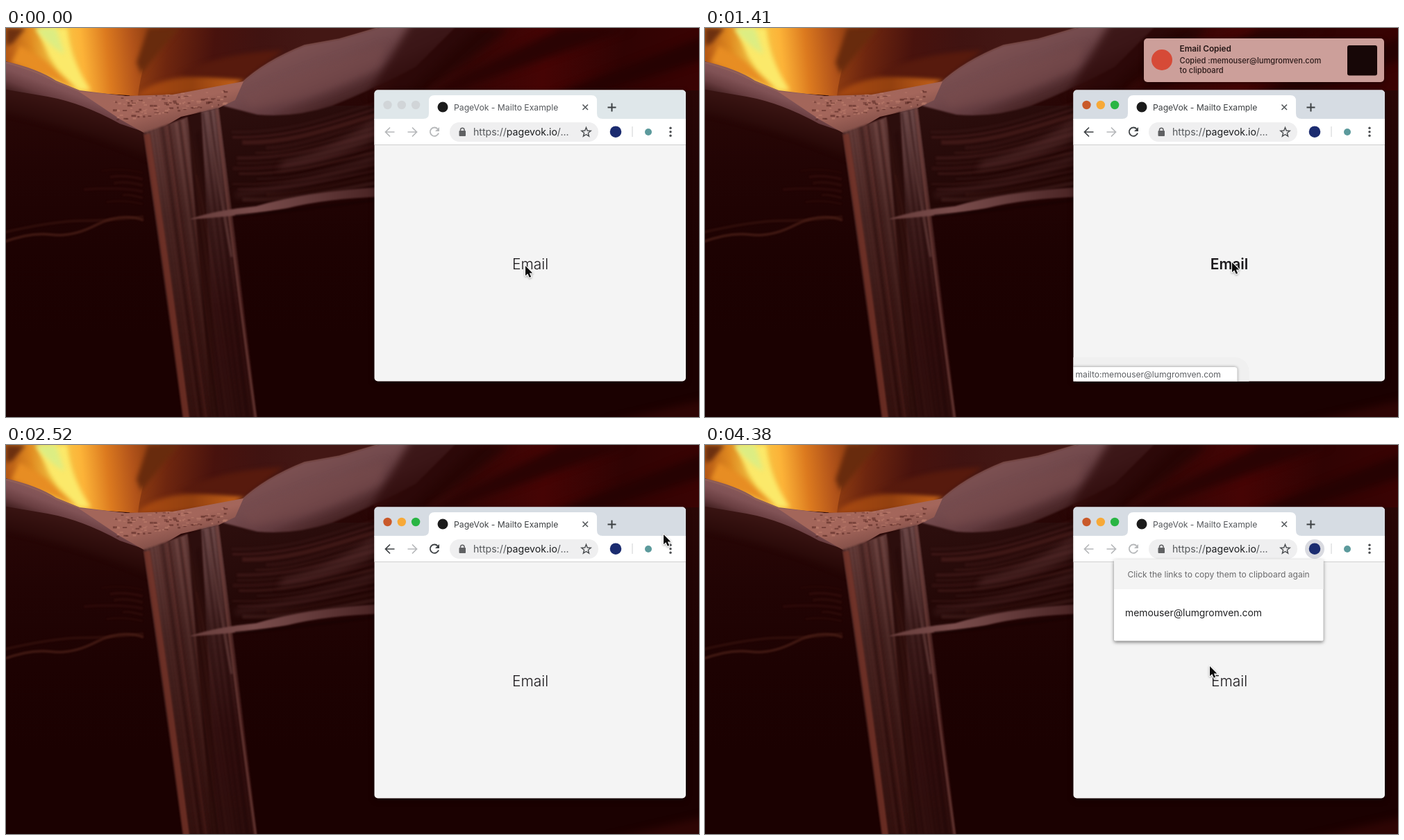
Animation, 998 px wide and 561 px high, one loop 4410 ms. Source, as an HTML page with a canvas:

```html
<!DOCTYPE html>
<html lang="en">
<head>
<meta charset="utf-8">
<title>Copy email on click</title>
<style>
  html, body { margin: 0; width: 100%; height: 100%; overflow: hidden; background: #1c0202; }
  canvas { display: block; }
</style>
</head>
<body>
<canvas id="stage" width="998" height="561"></canvas>
<script>
const W = 998, H = 561, LOOP = 4410, STEP = 30;
const ctx = document.getElementById('stage').getContext('2d');
const ADDRESS = 'memouser@lumgromven.com';
const DARK = '#3c4043', PALE = '#b6b8ba';

// ---------- helpers ----------
function gradient(c, x0, y0, x1, y1, ...stops) {
  const g = c.createLinearGradient(x0, y0, x1, y1);
  stops.forEach((color, i) => g.addColorStop(i / (stops.length - 1), color));
  return g;
}

// "M..." path strings keep the shapes compact
function fill(c, d, color) { c.fillStyle = color; c.fill(new Path2D(d)); }

function line(c, d, color, width = 1) {
  c.strokeStyle = color;
  c.lineWidth = width;
  c.stroke(new Path2D(d));
}

function blurred(c, radius, draw) {
  c.filter = `blur(${radius}px)`;
  draw();
  c.filter = 'none';
}

function disc(x, y, r, color) {
  ctx.fillStyle = color;
  ctx.beginPath();
  ctx.arc(x, y, r, 0, Math.PI * 2);
  ctx.fill();
}

function box(x, y, w, h, r, color) {
  ctx.fillStyle = color;
  ctx.beginPath();
  ctx.roundRect(x, y, w, h, r);
  ctx.fill();
}

function text(s, x, y, size, color, weight = 400, align = 'left') {
  ctx.font = `${weight} ${size}px Inter, sans-serif`;
  ctx.fillStyle = color;
  ctx.textAlign = align;
  ctx.fillText(s, x, y);
  return x + ctx.measureText(s).width;
}

function shadowed(blur, dy, alpha, draw) {
  ctx.save();
  ctx.shadowColor = `rgba(0,0,0,${alpha})`;
  ctx.shadowBlur = blur;
  ctx.shadowOffsetY = dy;
  draw();
  ctx.restore();
}

function randomizer(seed) {
  return () => (seed = (seed * 16807) % 2147483647) / 2147483647;
}

const clamp = v => Math.max(0, Math.min(1, v));
const smooth = v => { v = clamp(v); return v * v * (3 - 2 * v); };
const ramp = (t, a, b) => smooth((t - a) / (b - a));

// ---------- wallpaper ----------
function paintHollow(c) {
  fill(c, 'M520 0H998V90H530Z', gradient(c, 560, 0, 998, 60, '#3c100e', '#340605', '#460404', '#300303', '#3a0303'));
  blurred(c, 6, () => {
    fill(c, 'M650 0L725 0 600 95 530 100Z', '#270504');
    fill(c, 'M800 0L900 0 640 92 610 92Z', '#2a0303');
    fill(c, 'M1010 10L1010 44 850 95 790 95Z', '#260202');
    fill(c, 'M1010 535L1010 570 860 570Z', '#2e0504');
  });
  fill(c, 'M150 0H560L390 60 335 90 180 104Z', gradient(c, 170, 10, 430, 40, '#a34a13', '#6e260f', '#48120d', '#401311', '#431714'));
  fill(c, 'M0 0H222Q196 45 190 98L100 92 0 48Z', gradient(c, 0, 22, 215, 0, '#b65a16', '#e08a20', '#f6d04c', '#fcb338', '#dc7a1f', '#b3541a', '#86380f'));
  blurred(c, 3, () => {
    fill(c, 'M44 0H88Q92 45 122 90H104Q80 70 62 40Z', '#fbe96a');
    fill(c, 'M42 0H72L84 38Q60 25 42 0Z', '#dced83');
    fill(c, 'M0 0H28L10 22 0 26Z', '#6c3010');
    fill(c, 'M20 25L58 48 100 88 60 70 8 50Z', '#e78d23');
    fill(c, 'M205 0H250Q215 40 195 66L188 50Z', '#682b0d');
    fill(c, 'M188 98Q225 60 345 72L325 88 230 98Z', gradient(c, 190, 0, 345, 0, '#a94a12', '#93400f', '#c9661b'));
    fill(c, 'M250 66Q310 35 400 32L345 74Z', '#571a0d');
  });
}

function paintSlopes(c, rnd) {
  // strata below the right slope, fading into the shade
  fill(c, 'M300 112H540V232L430 246 318 262Z', gradient(c, 360, 110, 400, 262, '#2c0e0d', '#260a09', '#200504'));
  blurred(c, 1.5, () => {
    for (let i = 0; i < 14; i++) {
      const y = 150 + i * 7.5, end = 104 + i * 9;
      line(c, `M${325 + rnd() * 50} ${y}C410 ${y + 2} 470 ${(y + end) / 2} 545 ${end}`,
        `rgba(${95 + rnd() * 30},56,54,${.12 + rnd() * .28})`, 1.5 + rnd() * 5);
    }
  });
  blurred(c, 4, () => {
    fill(c, 'M400 192Q480 172 545 120V152Q480 192 390 205Z', 'rgba(96,54,54,.45)');
    fill(c, 'M330 236Q440 222 545 175V190Q440 232 330 246Z', 'rgba(88,46,46,.35)');
  });

  // left slope
  blurred(c, 3, () => fill(c, 'M-10 84L70 90 165 128 202 148 206 190Q120 150 -10 122Z', gradient(c, 60, 92, 45, 150, '#3d1715', '#230504')));
  blurred(c, .7, () => fill(c, 'M-5 47Q45 58 72 76L106 90 172 98 205 152 164 138Q110 108 60 99L-5 88Z',
    gradient(c, 62, 66, 46, 108, '#8a5a5b', '#805255', '#683d40', '#3e1c1c')));
  line(c, 'M0 50Q45 62 72 78L106 91', 'rgba(156,104,90,.55)', 2);

  // right slope
  blurred(c, 1, () => fill(c, 'M312 112L338 80Q372 48 430 25L480 16 548 -4H650L590 56Q530 88 470 112 415 130 362 125Z',
    gradient(c, 425, 24, 468, 122, '#7d5152', '#734a4d', '#623b3f', '#3c1a1a')));
  blurred(c, 6, () => {
    fill(c, 'M340 98Q420 62 545 24L540 55Q450 104 352 116Z', 'rgba(124,78,78,.5)');
    fill(c, 'M585 -10H690L580 90 520 98Z', 'rgba(46,10,10,.75)');
  });
  line(c, 'M338 81Q372 48 430 25L480 16 535 0', 'rgba(140,92,86,.5)', 1.5);

  // faint ridges on the left wall
  blurred(c, 1.2, () => {
    for (let i = 0; i < 6; i++) {
      const y = 206 + i * 9;
      line(c, `M${110 + rnd() * 60} ${y}Q170 ${y - 4} 197 ${y + 3}`, `rgba(83,33,26,${.12 + rnd() * .18})`, 2 + rnd() * 2);
    }
    line(c, 'M-4 309Q35 294 65 298T130 284 198 277', 'rgba(84,38,28,.6)', 4);
    line(c, 'M-4 295Q70 278 110 278T198 272', 'rgba(72,28,22,.4)', 4);
  });
}

function paintShelf(c, rnd) {
  fill(c, 'M104 91L172 98 240 96 342 77 330 104 305 116 252 128 225 144 200 152 165 132Z',
    gradient(c, 190, 92, 205, 150, '#a3665a', '#a4665b', '#845049'));
  blurred(c, .6, () => {
    for (let i = 0; i < 120; i++) {
      const u = rnd();
      c.fillStyle = rnd() < .5 ? 'rgba(84,38,32,.55)' : 'rgba(196,132,114,.5)';
      c.fillRect(150 + u * 165, 101 - u * 12 + rnd() * (34 - u * 14), 2 + rnd() * 5, 1 + rnd() * 2);
    }
  });
}

function paintSandfall(c, rnd) {
  blurred(c, 1.2, () => {
    fill(c, 'M198 151L222 143 262 128 278 220 306 561H254Z', gradient(c, 0, 130, 0, H, '#6b423f', '#4d2926', '#3f1b18', '#361310'));
    fill(c, 'M262 128L281 121 316 561H296Z', gradient(c, 0, 125, 0, H, '#2c0e0d', '#2e0e0c', '#2e0f0c'));
    fill(c, 'M281 121L306 115 330 300 362 561H305Z', gradient(c, 0, 115, 0, H, '#6d4949', '#41201f', '#310f0f', '#2e0e0d'));
    for (let i = 0; i < 34; i++) {
      const u = rnd(), tone = rnd(), gap = u > .58 && u < .76;
      const top = 151 - u * 36 + (gap ? 90 * rnd() : 0);
      line(c, `M${199 + u * 107} ${top}Q${226 + u * 107} 340 ${257 + u * 104} 565`,
        tone < .5 ? 'rgba(32,5,5,.2)' : `rgba(${110 + 30 * tone},70,64,${gap ? .07 : .15})`, 1.5 + rnd() * 4);
    }
    line(c, 'M203 153Q230 330 260 565', 'rgba(122,54,42,.75)', 9);
    line(c, 'M303 117Q327 330 360 565', 'rgba(116,68,64,.65)', 2.5);
    line(c, 'M291 120Q304 220 325 330', 'rgba(150,104,100,.28)', 4);
  });
}

function paintLedge(c) {
  blurred(c, .8, () => {
    fill(c, 'M266 275Q305 262 360 257 430 236 545 229V243Q460 246 405 260 350 270 266 276Z',
      gradient(c, 270, 0, 530, 0, '#683e3c', '#7a4d4c', '#633a3a', '#4a2424'));
    line(c, 'M330 271Q430 262 545 246', 'rgba(22,2,2,.5)', 4);
  });
}

function paintWallpaper() {
  const canvas = document.createElement('canvas');
  canvas.width = W;
  canvas.height = H;
  const c = canvas.getContext('2d');
  const rnd = randomizer(77);
  c.fillStyle = gradient(c, 0, 80, 0, H, '#2a0706', '#220404', '#1d0202', '#1b0101', '#1b0101');
  c.fillRect(0, 0, W, H);
  paintHollow(c);
  paintSlopes(c, rnd);
  paintShelf(c, rnd);
  paintSandfall(c, rnd);
  paintLedge(c);
  return canvas;
}

// ---------- browser window ----------
function drawNav(active) {
  const arrow = (x, dir, color) => {
    line(ctx, `M${x - 6 * dir} 150H${x + 6.5 * dir}M${x} 143.5L${x - 6.5 * dir} 150 ${x} 156.5`, color, 1.7);
  };
  const main = active ? DARK : PALE;
  arrow(553, 1, main);
  arrow(585, -1, PALE);
  line(ctx, 'M621.7 145.6A6.2 6.2 0 1 0 623 151.5', main, 1.8);
  fill(ctx, 'M624 143V149H618Z', main);
}

function drawWindow(s) {
  shadowed(10, 3, .3, () => box(530.5, 89.5, 448.5, 420, 5, '#f4f4f4'));
  box(530.5, 89.5, 448.5, 43, [5, 5, 0, 0], s.focused ? '#d6dce3' : '#dfe7ea');
  ctx.fillStyle = '#fff';
  ctx.fillRect(530.5, 131, 448.5, 37);
  ctx.fillStyle = '#cfcfcf';
  ctx.fillRect(530.5, 168, 448.5, 1);

  const lights = s.focused ? ['#c9592a', '#f7a938', '#29b544'] : ['#d1d5d8', '#d1d5d8', '#d1d5d8'];
  lights.forEach((color, i) => disc(549.5 + i * 20.3, 111, 6.2, color));

  fill(ctx, 'M601 131Q609 131 609 123V105Q609 97 617 97H843Q851 97 851 105V123Q851 131 859 131Z', '#fff');
  disc(629, 114, 7.5, '#1b1b1b');
  text('PageVok - Mailto Example', 645, 118.5, 12.2, s.navActive ? '#3d4043' : '#55585c');
  line(ctx, 'M830.5 110.5L838 118M838 110.5L830.5 118', '#55595c', 1.6);
  line(ctx, 'M866.5 114.5H878.5M872.5 108.5V120.5', DARK, 2);

  drawNav(s.navActive);
  box(639, 136, 214, 28, 14, '#efeff0');
  box(652.5, 148, 9.5, 8, 1, '#606163');
  line(ctx, 'M654.5 148.5V146.5A2.8 2.8 0 0 1 660 146.5V148.5', '#606163', 1.5);
  let x = text('https://', 673, 154.8, 14.1, '#55585b');
  x = text('pagevok.io', x, 154.8, 14.1, '#1c1e20');
  text('/...', x, 154.8, 14.1, '#55585b');

  ctx.beginPath();
  for (let i = 0; i < 10; i++) {
    const a = -Math.PI / 2 + i * Math.PI / 5, r = i % 2 ? 3 : 7;
    ctx.lineTo(835.5 + r * Math.cos(a), 150.5 + r * Math.sin(a));
  }
  ctx.closePath();
  ctx.strokeStyle = '#4b4e51';
  ctx.lineWidth = 1.4;
  ctx.stroke();

  if (s.popup) disc(878, 150, 14, '#d9dae0');
  disc(878, 149.7, 8.3, '#1b2c70');
  ctx.fillStyle = '#cfd1d3';
  ctx.fillRect(901.5, 142, 1, 15);
  disc(925, 150, 5, '#5c9a9c');
  [144.3, 149.8, 155.3].forEach(y => disc(957, y, 1.7, '#4b4e51'));

  text('Email', 755, 347.8, 21, '#1c1a1d', s.hover ? 600 : 350, 'center');
}

function drawStatus(width, long) {
  ctx.save();
  ctx.beginPath();
  ctx.rect(530.5, 470, 448.5, 39.5);
  ctx.clip();
  box(510, 475, width + 37, 60, 20, '#f0f0f0');
  shadowed(4, 0, .4, () => box(526, 489, width + 4, 26, [0, 4, 0, 0], '#fff'));
  text(long ? 'mailto:' + ADDRESS : 'mailto:' + ADDRESS.slice(0, 11) + '...', 533.5, 503.5, 12.1, '#5d6064');
  ctx.restore();
}

function drawPopup() {
  shadowed(5, 2, .5, () => box(589, 165, 301.5, 117.5, 2, '#fff'));
  ctx.fillStyle = '#f4f4f4';
  ctx.fillRect(589, 165, 301.5, 43);
  text('Click the links to copy them to clipboard again', 608.5, 191.2, 12.05, '#6a6a6c');
  text(ADDRESS, 605, 247.3, 13.9, '#202022');
}

function drawBanner(offset) {
  ctx.save();
  ctx.translate(offset, 0);
  shadowed(7, 2, .4, () => box(632, 15, 346, 63, 5, '#cc9f9a'));
  disc(658, 46, 15, '#d64a37');
  text('Email Copied', 683.5, 34, 11.8, '#251716', 600);
  text('Copied :' + ADDRESS, 683.5, 51.3, 11.1, '#2b1a19', 500);
  text('to clipboard', 683.5, 65.3, 11.1, '#2b1a19', 500);
  box(925, 25, 43, 43.5, 3, '#170707');
  ctx.restore();
}

// ---------- pointer ----------
// time, x, y
const ROUTE = [
  [0, 748, 343], [150, 748, 343], [480, 759, 338], [1560, 759, 338],
  [2070, 741, 111], [2190, 752, 48], [2250, 756, 46], [2400, 945, 52],
  [2520, 947, 129], [2760, 878, 151], [3450, 878, 151], [4230, 727, 319], [LOOP, 727, 319]
];

function pointerAt(t) {
  const i = ROUTE.findIndex((stop, k) => k && t <= stop[0]);
  const [t0, x0, y0] = ROUTE[i - 1], [t1, x1, y1] = ROUTE[i];
  const k = ramp(t, t0, t1);
  return [x0 + (x1 - x0) * k, y0 + (y1 - y0) * k];
}

function drawPointer(x, y, hand) {
  ctx.save();
  ctx.translate(x, y);
  ctx.lineJoin = 'round';
  const d = hand
    ? 'M-1 1Q1 -1 2.5 1L4 6Q6 4.5 7 6.2 9 5.3 9.5 7 11.5 7 11 9.5L10 14 8.5 18H1.5L-1 14 -5 10.5Q-5 8 -2 9.5L0 11Z'
    : 'M0 0V14.3L3.3 11.3 5.8 16.8 8.2 15.7 5.8 10.4H10.3Z';
  if (hand) {
    fill(ctx, d, '#fff');
    line(ctx, d, '#29292b', 1.2);
    line(ctx, 'M3 11V15M5.3 11V15M7.5 11V15', '#555', .8);
  } else {
    shadowed(3, 1, .35, () => line(ctx, d, '#fff', 2.2));
    fill(ctx, d, '#0a0a0a');
  }
  ctx.restore();
}

// ---------- timeline ----------
const wallpaper = paintWallpaper();

function render(time) {
  const t = Math.floor((time % LOOP) / STEP) * STEP;
  const within = (a, b) => t >= a && t < b;
  const popup = t >= 2880;
  const focused = t >= 300;

  ctx.drawImage(wallpaper, 0, 0);
  drawWindow({ focused, navActive: focused && !popup, hover: within(330, 1680), popup });

  if (within(420, 2250)) {
    ctx.globalAlpha = ramp(t, 390, 480) * (1 - ramp(t, 2130, 2250));
    drawStatus(148 + 88.5 * ramp(t, 1050, 1230), t >= 1140);
    ctx.globalAlpha = 1;
  }
  if (popup) drawPopup();
  if (within(1050, 2460)) drawBanner(370 * (1 - ramp(t, 1050, 1350) + ramp(t, 2250, 2430)));

  drawPointer(...pointerAt(t), within(360, 1050));
}

const start = performance.now();
function tick() {
  render(performance.now() - start);
  requestAnimationFrame(tick);
}
tick();
</script>
</body>
</html>
```
